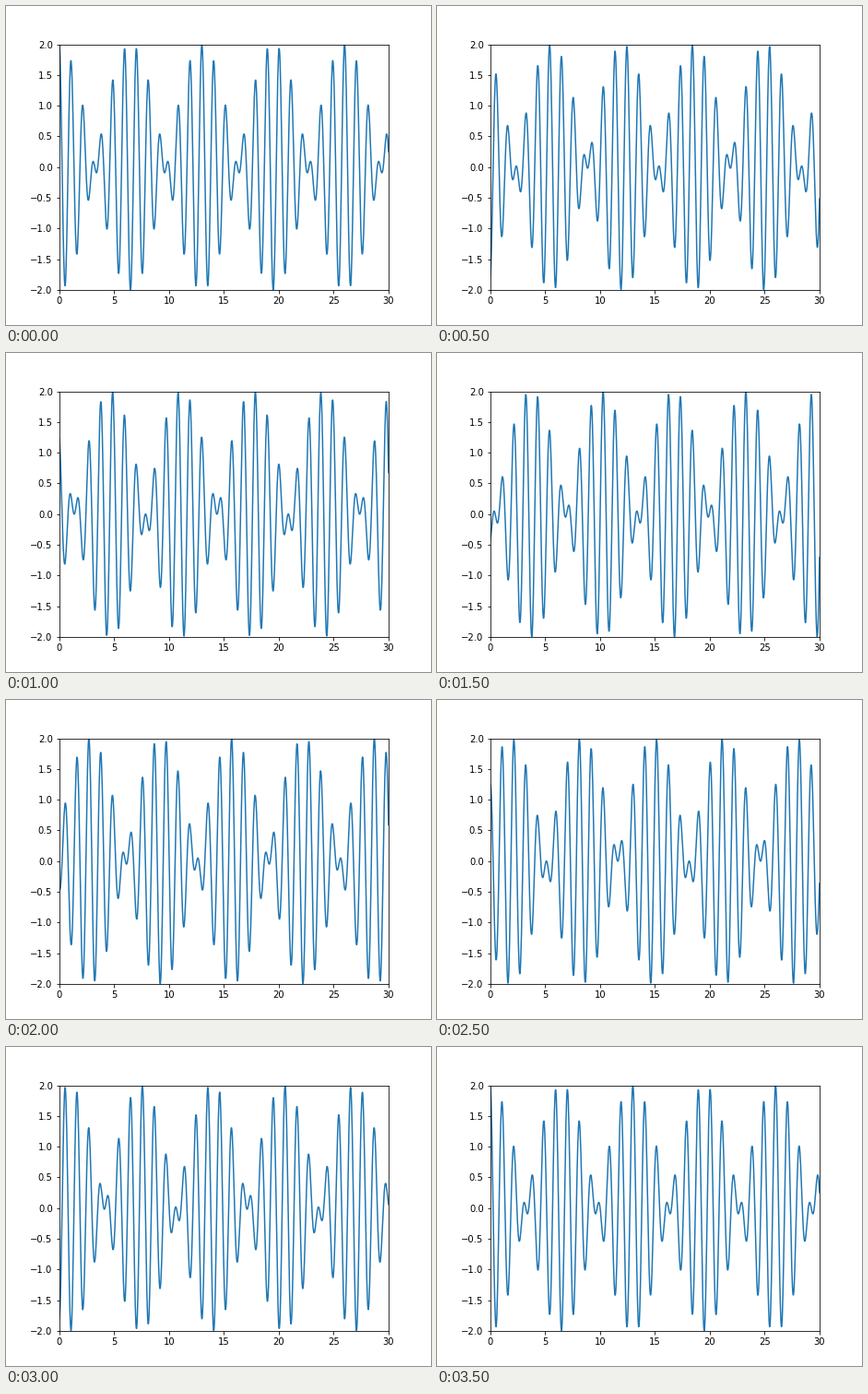
Recreate the animation shown at these times as a matplotlib script. Size 461 by 346 pixels, loop 4 s.

```python
import numpy as np
import matplotlib.pyplot as plt
from matplotlib.animation import FuncAnimation

WIDTH, HEIGHT, DPI = 461, 346, 72
FRAMES, INTERVAL = 8, 500
WAVELENGTHS = 1, 13 / 11
PHASE_STEP = 2 * np.pi * 4 / 7

x = np.linspace(0, 30, 1000)


def beats(frame):
    """Sum of two waves travelling in opposite directions."""
    phase = PHASE_STEP * frame
    k1, k2 = (2 * np.pi / w for w in WAVELENGTHS)
    return np.cos(k1 * x + phase) + np.cos(k2 * x - phase)


fig, ax = plt.subplots(figsize=(WIDTH / DPI, HEIGHT / DPI), dpi=DPI)
ax.set(xlim=(0, 30), ylim=(-2, 2))
line, = ax.plot(x, beats(0), color="#1f77b4", lw=1.5)


def update(frame):
    line.set_ydata(beats(frame))
    return line,


anim = FuncAnimation(fig, update, frames=FRAMES, interval=INTERVAL,
                     repeat=True, repeat_delay=0)
plt.show()
```
